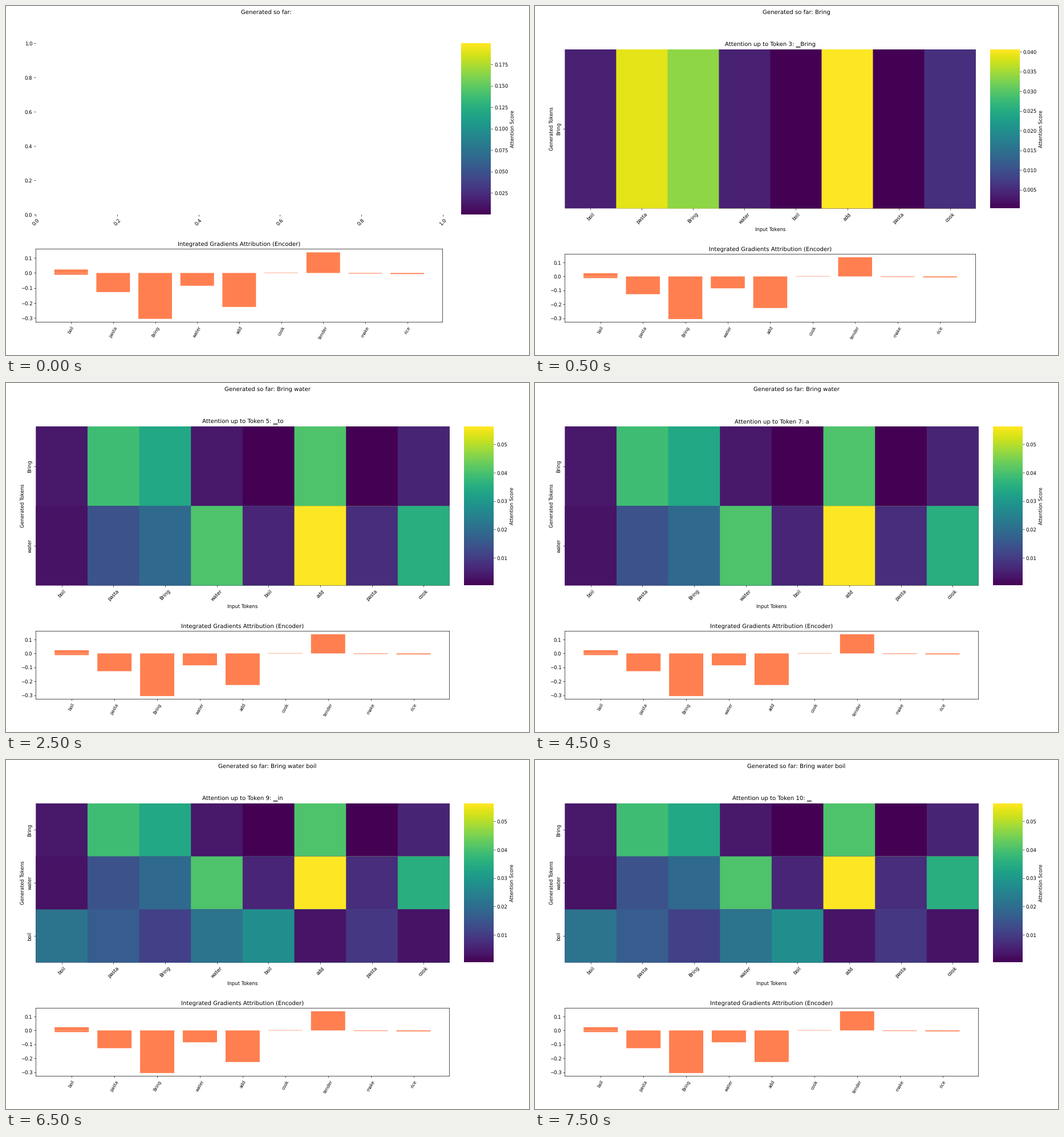
Write a matplotlib script that moves like this. It is 917 px wide and 611 px high and loops after 8000 ms.

```python
import matplotlib.pyplot as plt
import numpy as np
from matplotlib.animation import FuncAnimation
from matplotlib.cm import ScalarMappable
from matplotlib.colors import Normalize
from matplotlib.patches import Rectangle

W, H, DPI = 917, 611, 61.125
STEP = 500  # ms per frame
LOOP = 8000

# Sizes sit just beside 10 and 12 so that glyphs round to the right pixel height
TITLE_SIZE = 11.95
plt.rcParams.update({
    "font.family": "DejaVu Sans",
    "font.size": 10.05,
    "text.hinting": "none",
    "path.snap": False,
})

INPUTS = ["boil", "pasta", "Bring", "water", "boil", "add", "pasta", "cook"]
OUTPUTS = ["Bring", "water", "boil"]
SCORES = np.array([
    [.0040, .0389, .0338, .0040, .0003, .0406, .0004, .0059],
    [.0031, .0143, .0193, .0406, .0062, .0563, .0073, .0356],
    [.0216, .0165, .0110, .0216, .0277, .0032, .0092, .0030],
])

# "boil" occurs twice, so its bar has a positive and a negative part
BARS = [("boil", .023), ("boil", -.012), ("pasta", -.127), ("Bring", -.305),
        ("water", -.085), ("add", -.226), ("cook", .0025), ("tender", .137),
        ("make", -.004), ("rice", -.007)]

# Decoded tokens from number 3 on, with the count of heatmap rows so far
BLOCK = "\u2581"
TOKENS = [(BLOCK + "Bring", 1), (BLOCK + "water", 2), (BLOCK + "to", 2),
          (BLOCK, 2), ("a", 2), (BLOCK + "boil", 3), (BLOCK + "in", 3),
          (BLOCK, 3)]

LEFT = 52.3

fig = plt.figure(figsize=((W + 1e-6) / DPI, (H + 1e-6) / DPI), dpi=DPI,
                 facecolor="white")


def add_axes(x0, y0, x1, y1):
    """Axes from pixel edges measured from the top left."""
    return fig.add_axes([x0 / W, 1 - y1 / H, (x1 - x0) / W, (y1 - y0) / H])


def hide_spines(ax):
    for spine in ax.spines.values():
        spine.set_visible(False)


def draw_colorbar(cax, vmin, vmax, step, digits):
    mappable = ScalarMappable(Normalize(vmin, vmax), "viridis")
    bar = fig.colorbar(mappable, cax=cax, label="Attention Score")
    bar.outline.set_visible(False)
    ticks = np.arange(1, int(vmax / step) + 1) * step
    bar.set_ticks(ticks, labels=[f"{t:.{digits}f}" for t in ticks])


def draw_cells(ax, data):
    """Each cell reaches to the far corner, so smooth edges leave no gaps."""
    rows, cols = data.shape
    colors = plt.get_cmap("viridis")(Normalize(data.min(), data.max())(data))
    for i, j in np.ndindex(rows, cols):
        ax.add_patch(Rectangle((j, i), cols - j, rows - i, linewidth=0,
                               facecolor=colors[i, j], clip_on=False))


def draw_bars(right, top):
    ax = add_axes(LEFT, top, right, 553.5)
    names, values = zip(*BARS)
    ax.bar(names, values, color="coral")
    ax.set_yticks(np.arange(-3, 2) / 10)
    ax.tick_params(axis="x", labelrotation=60, labelsize=9)
    ax.set_title("Integrated Gradients Attribution (Encoder)",
                 fontsize=TITLE_SIZE)


def draw_empty():
    ax = add_axes(LEFT, 65.5, 765.5, 365)
    hide_spines(ax)
    ax.tick_params(axis="x", labelrotation=45)
    draw_colorbar(add_axes(798, 65.5, 850, 365), .00005, .1993, .025, 3)
    draw_bars(765.5, 425.5)


def draw_heatmap(index):
    token, rows = TOKENS[index]
    right, bar_left = (772.6, 798) if rows == 1 else (777.5, 803.2)
    top, bottom = 76, 354.4
    data = SCORES[:rows]

    ax = add_axes(LEFT, top, right, bottom)
    hide_spines(ax)
    draw_cells(ax, data)
    ax.set(xlim=(0, len(INPUTS)), ylim=(rows, 0))
    ax.set_xticks(np.arange(len(INPUTS)) + .5, labels=INPUTS, rotation=45)
    ax.set_yticks(np.arange(rows) + .5, labels=OUTPUTS[:rows],
                  rotation=90, va="center")
    ax.set_xlabel("Input Tokens")
    ax.set_ylabel("Generated Tokens")
    ax.set_title(f"Attention up to Token {index + 3}: {token}",
                 fontsize=TITLE_SIZE)

    step, digits = (.005, 3) if rows == 1 else (.01, 2)
    cax = add_axes(bar_left, top, bar_left + 51.5, bottom)
    draw_colorbar(cax, data.min(), data.max(), step, digits)
    draw_bars(right, 434.5)


def draw(frame):
    fig.clear()
    index = (frame + 1) // 2 - 1  # a new token every second, after half a second
    if index < 0:
        draw_empty()
        words = []
    else:
        draw_heatmap(index)
        words = OUTPUTS[:TOKENS[index][1]]
    fig.suptitle("Generated so far: " + " ".join(words), y=.99,
                 fontsize=TITLE_SIZE)
    return []


anim = FuncAnimation(fig, draw, frames=LOOP // STEP, interval=STEP,
                     init_func=lambda: draw(0), repeat=True, repeat_delay=0)
plt.show()
```
